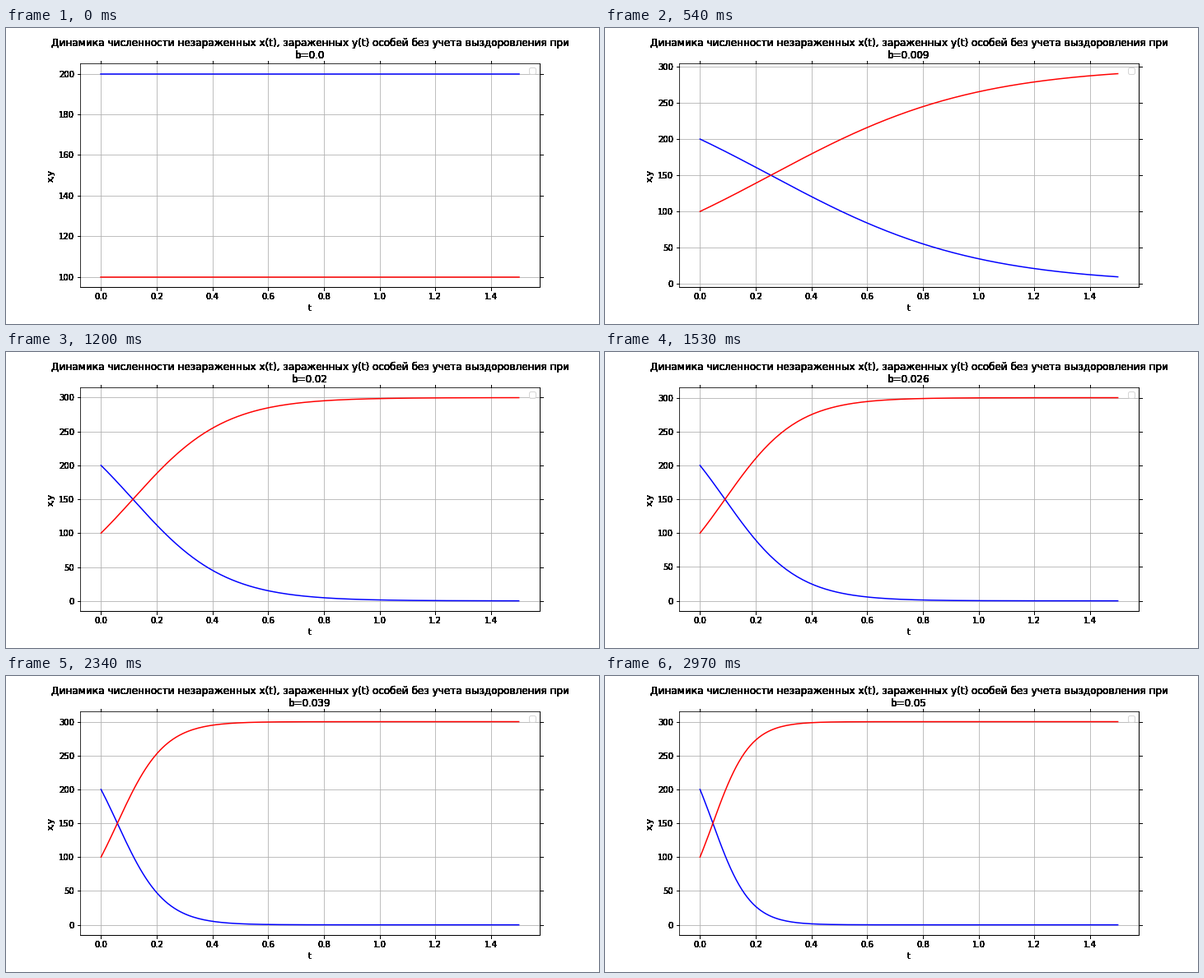
Animation, 720 px wide and 360 px high, one loop 3 s. Source, as a matplotlib script:

```python
import numpy as np
import matplotlib.pyplot as plt
from matplotlib.animation import FuncAnimation

FRAMES, STEP_MS = 100, 30
X0, Y0 = 200, 100
TITLE = ("Динамика численности незараженных x(t), зараженных y(t) "
         "особей без учета выздоровления при\nb={}")

plt.rcParams.update({"font.family": "DejaVu Sans", "font.size": 10})


def harden(artist, passes=12):
    """Paint the artist several times so its soft edges turn solid."""
    draw = artist.draw

    def repeat(renderer):
        for _ in range(passes):
            draw(renderer)

    artist.draw = repeat


def infected(t, b):
    """Solution of y' = b*x*y with x + y constant."""
    total = X0 + Y0
    return total / (1 + X0 / Y0 * np.exp(-total * b * t))


fig, ax = plt.subplots(figsize=(10, 5), dpi=72, facecolor="white")
fig.subplots_adjust(left=0.125, right=0.9, bottom=0.125, top=0.88)
ax.grid(True)
ax.tick_params(top=True, right=True)
ax.set_xlabel("t")
ax.set_ylabel("x,y")
title = ax.set_title(TITLE.format(0.0))
ax.legend(handles=[], loc="upper right")

t = np.linspace(0, 1.5, 151)
rates = np.linspace(0, 0.05, FRAMES)
healthy, = ax.plot(t, np.full_like(t, X0), color="b", lw=1.5)
sick, = ax.plot(t, np.full_like(t, Y0), color="r", lw=1.5)

for part in (title, ax.xaxis.label, ax.yaxis.label,
             ax.spines["right"], ax.spines["bottom"]):
    harden(part)
for axis in (ax.xaxis, ax.yaxis):
    for tick in axis.get_major_ticks(16):
        for part in (tick.label1, tick.tick1line, tick.tick2line):
            harden(part)


def update(i):
    b = rates[i]
    y = infected(t, b)
    healthy.set_ydata(X0 + Y0 - y)
    sick.set_ydata(y)
    ax.relim()
    ax.autoscale_view()
    title.set_text(TITLE.format(round(float(b), 3)))
    return healthy, sick, title


anim = FuncAnimation(fig, update, frames=FRAMES, interval=STEP_MS,
                     repeat=True, repeat_delay=0, blit=False)
plt.show()
```
